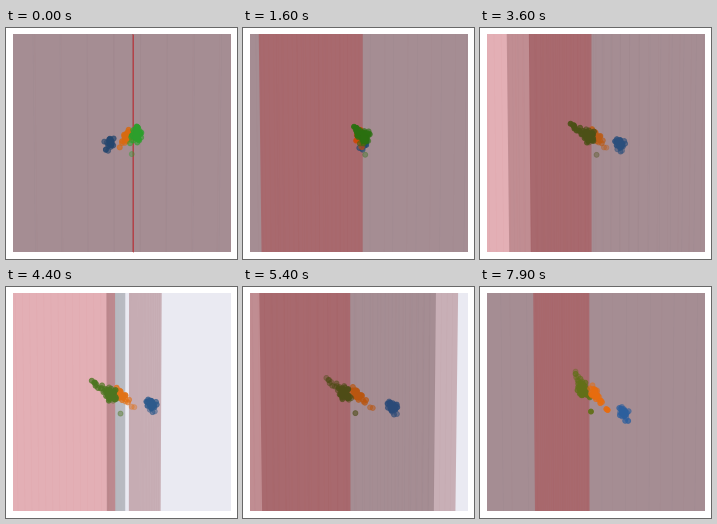
Recreate the animation shown at these times as a matplotlib script. Size 231 px wide and 231 px high, loop 8000 ms.

```python
import numpy as np
import matplotlib.pyplot as plt
from matplotlib.animation import FuncAnimation
from matplotlib.collections import LineCollection
from matplotlib.colors import to_rgb
from matplotlib.patches import Polygon, Rectangle

SIZE, DPI, FRAMES, STEP = 231, 100, 80, 100
LEFT, TOP, SIDE = 7, 6, 218
PIVOT = 117
TAPER = 0.014      # planes narrow slightly towards the bottom
DEPTH_TO_Y = 0.23  # camera elevation

fig = plt.figure(figsize=(SIZE / DPI, SIZE / DPI), dpi=DPI, facecolor="white")
ax = fig.add_axes([0, 0, 1, 1])
ax.set_xlim(0, SIZE)
ax.set_ylim(SIZE, 0)
ax.axis("off")

stage = Rectangle((LEFT, TOP), SIDE, SIDE, fc="#eaeaf2", ec="none", zorder=0)
ax.add_patch(stage)


def wall_x(frame, s, offset):
    """Screen x of a wall through the scene, s from -1 (front) to 1 (back)."""
    phi = np.radians(2 * (frame - 45))
    along = s * 317 + 9
    depth = along * np.cos(phi) - offset * np.sin(phi)
    return PIVOT + (offset * np.cos(phi) + along * np.sin(phi)) / (1 + depth / 1350)


def red_x(frame, s):
    """Screen x of the half plane, s from 0 (hinge) to 1 (outer edge)."""
    theta = np.radians(2 * frame)
    hinge = 119.7 - 12.7 * np.cos(np.radians(2 * (frame - 61)))
    return hinge - 168.6 * s * np.sin(theta) / (1 - 0.152 * s * np.cos(theta))


class Plane:
    def __init__(self, project, start, color, alpha, z):
        self.project = project
        self.s = np.linspace(start, 1, 25)
        self.face = Polygon(np.zeros((4, 2)), fc=color, ec="none", alpha=alpha, zorder=z)
        self.seams = LineCollection([], colors=color, alpha=0.02,
                                    linewidths=0.5, zorder=z)
        ax.add_patch(self.face)
        ax.add_collection(self.seams, autolim=False)
        self.face.set_clip_path(stage)
        self.seams.set_clip_path(stage)

    def update(self, frame):
        x = self.project(frame, self.s)
        lean = TAPER * (x - PIVOT)
        top = np.column_stack([x + lean, np.full_like(x, TOP)])
        low = np.column_stack([x - lean, np.full_like(x, TOP + SIDE)])
        self.face.set_xy([top[0], top[-1], low[-1], low[0]])
        self.seams.set_segments(list(np.stack([top, low], axis=1)[1:-1]))


class Cluster:
    KEYS = [0, 16, 36, 44, 54, 67, 79]

    def __init__(self, points, tints):
        self.u, self.v, self.w = np.array(points).T
        self.tints = np.array([to_rgb("#" + c) for c in tints.split()])
        self.dots = ax.scatter(self.u, self.w, s=13, linewidths=0.6)

    def update(self, frame):
        a = np.radians(2 * (frame - 60))
        depth = self.u * np.sin(a) + self.v * np.cos(a)
        x = 119 + self.u * np.cos(a) - self.v * np.sin(a)
        self.dots.set_offsets(np.column_stack([x, self.w + DEPTH_TO_Y * depth]))
        near = (depth - depth.min()) / np.ptp(depth)
        rgba = np.ones((len(x), 4))
        for i in range(3):
            rgba[:, i] = np.interp(frame, self.KEYS, self.tints[:, i])
        rgba[:, 3] = 0.35 + 0.6 * near
        self.dots.set_facecolors(rgba)
        self.dots.set_edgecolors(rgba)
        self.dots.set_zorder(10 + depth.mean() / 100)


def cloud(rng, n, u, v, w, slope, spread):
    du, dv, dw = np.clip(rng.normal(size=(3, n)), -1.9, 1.9) * np.array(spread)[:, None]
    return np.column_stack([u + du, v + dv, w + slope * du + dw])


rng = np.random.default_rng(7)
tail_u = np.linspace(-35, -25, 9)
tail = np.column_stack([tail_u + rng.normal(0, 1, 9),
                        -5 + 0.4 * (tail_u + 33) + rng.normal(0, 1.5, 9),
                        95 + 0.6 * (tail_u + 33) + rng.normal(0, 1.6, 9)])
green = np.vstack([cloud(rng, 38, -18.5, 3, 105, 0.55, (3.8, 3.6, 3.6)),
                   tail, [[-7.5, 3.5, 125]]])
orange = np.vstack([cloud(rng, 34, -3.5, -1, 110, 0.8, (4.4, 2.8, 3)),
                    [[8.5, -1, 121], [11, 0, 121.5]]])
blue = cloud(rng, 32, 31.5, 0, 122, 0.6, (2.6, 2.1, 3.4))

planes = [
    Plane(lambda f, s: wall_x(f, s, -9), -1, "#000a10", 0.20, 1),
    Plane(red_x, 0, "#d00000", 0.25, 2),
    Plane(lambda f, s: wall_x(f, s, 18.75), -1, "#640004", 0.25, 3),
]
clusters = [
    Cluster(blue, "24466e 1f4a70 2b4f7c 2d5a8c 2a4a78 2a5590 2c5f9e"),
    Cluster(orange, "d96a10 d04808 bc5c16 e27216 ba5610 cc5a0e e86c0e"),
    Cluster(green, "2ca02c 2a7010 4c5016 4d7520 4e4c16 555a18 627018"),
]
# the red plane seen exactly edge-on
edge, = ax.plot([126.5, 126.5], [TOP, TOP + SIDE], color="#c01018",
                alpha=0.6, lw=0.72, zorder=4, solid_capstyle="butt")


def draw(frame):
    for part in planes + clusters:
        part.update(frame)
    edge.set_visible(frame == 0)
    return []


anim = FuncAnimation(fig, draw, frames=FRAMES, interval=STEP,
                     repeat=True, repeat_delay=0, blit=False)
plt.show()
```
